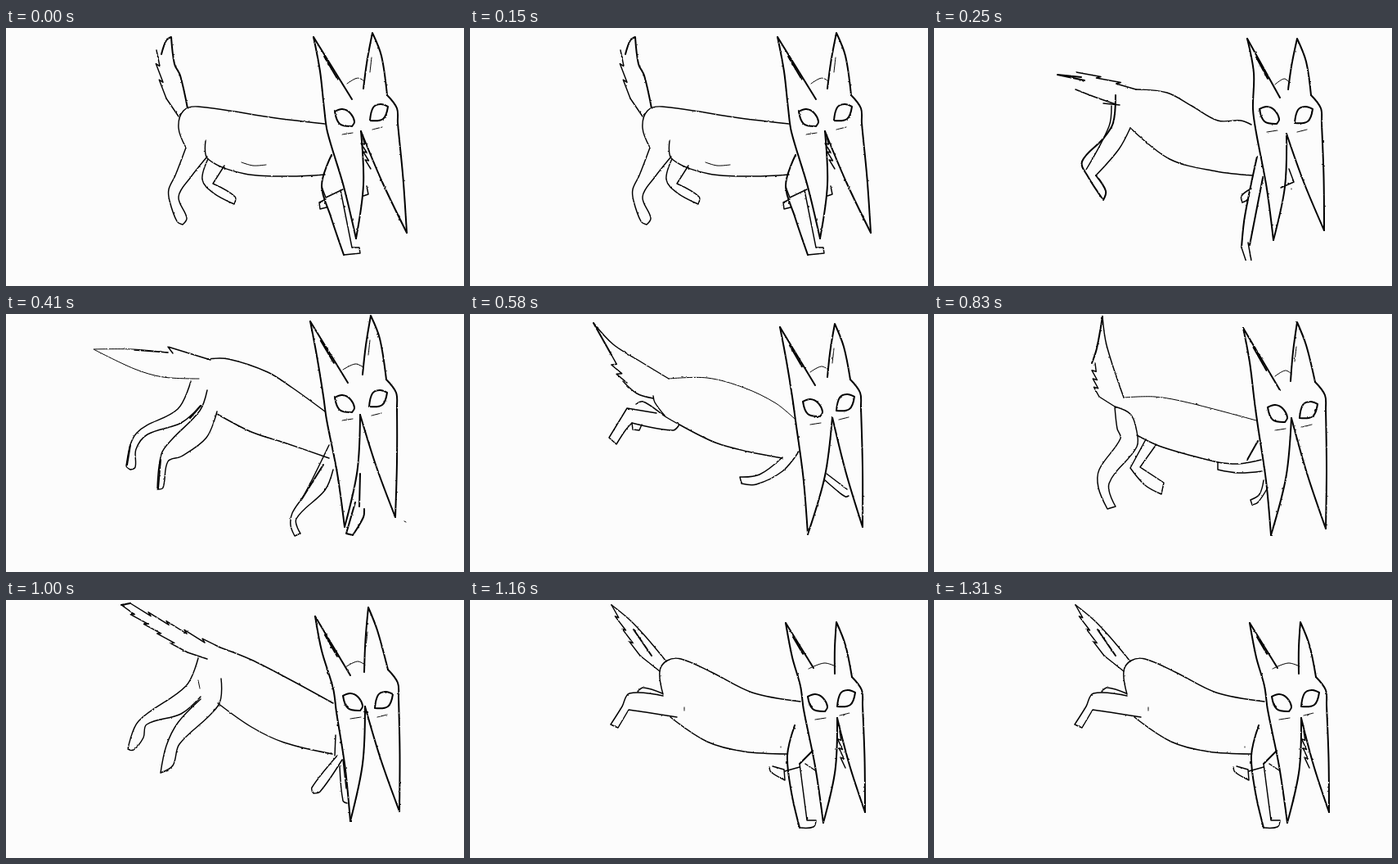
Write an HTML page that moves like this. It is 560x315 px and loops after 1410 ms.

```html
<!DOCTYPE html>
<html lang="en">
<head>
<meta charset="utf-8">
<title>Masked dog run cycle</title>
<style>
  html, body { margin: 0; width: 100%; height: 100%; overflow: hidden; background: #fcfcfc; }
  svg { display: block; width: 100vw; height: 100vh; }
  path { fill: none; stroke: #000; stroke-linecap: round; stroke-linejoin: round; }
</style>
</head>
<body>
<svg viewBox="0 0 560 315">
  <filter id="rough" filterUnits="userSpaceOnUse" width="560" height="315" color-interpolation-filters="sRGB">
    <feTurbulence type="fractalNoise" baseFrequency=".25" numOctaves="2" seed="4"/>
    <feDisplacementMap in="SourceGraphic" scale="2" xChannelSelector="R" yChannelSelector="G"/>
  </filter>
  <g id="dog" filter="url(#rough)"></g>
</svg>
<script>
const dog = document.getElementById('dog');

// Smooth line through x, y pairs; sharp turns stay corners.
function trace(n) {
  const pts = [];
  for (let i = 0; i < n.length; i += 2) pts.push([n[i], n[i + 1]]);
  const gap = (a, b) => [b[0] - a[0], b[1] - a[1]];
  const tangent = i => {
    if (!i || i === pts.length - 1) return [0, 0];
    const a = gap(pts[i - 1], pts[i]), b = gap(pts[i], pts[i + 1]);
    const cos = (a[0] * b[0] + a[1] * b[1]) / (Math.hypot(...a) * Math.hypot(...b));
    if (cos < .4) return [0, 0];
    const c = gap(pts[i - 1], pts[i + 1]), len = Math.hypot(...c);
    return [c[0] / len, c[1] / len];
  };
  let d = 'M' + pts[0];
  for (let i = 1; i < pts.length; i++) {
    const p = pts[i - 1], q = pts[i], r = Math.hypot(...gap(p, q)) / 3;
    const s = tangent(i - 1), e = tangent(i);
    d += `C${p[0] + s[0] * r} ${p[1] + s[1] * r} ${q[0] - e[0] * r} ${q[1] - e[1] * r} ${q}`;
  }
  return d;
}

const pen = width => (...n) => {
  const path = document.createElementNS('http://www.w3.org/2000/svg', 'path');
  path.setAttribute('d', trace(n));
  path.setAttribute('stroke-width', width);
  dog.append(path);
};
const fine = pen(1), ink = pen(1.45), bold = pen(2);

// Row of teeth standing h off the line.
function fur(x, y, x2, y2, teeth, h) {
  const dx = x2 - x, dy = y2 - y, len = Math.hypot(dx, dy), n = [x, y];
  for (let k = 1; k <= teeth; k++) {
    const t = k / teeth, u = t - .2 / teeth;
    n.push(x + dx * t, y + dy * t);
    if (k < teeth) n.push(x + dx * u - dy / len * h, y + dy * u + dx / len * h);
  }
  ink(...n);
}

function eye(x, y, ...shape) {
  const n = shape.map((v, i) => v + (i % 2 ? y : x));
  bold(...n, n[0], n[1]);
}

// Ear tips l, t and bases b, r, o; cheek c; jaw tips j, k; notch n; eyes e, f.
function head([lx, ly, bx, by], [rx, ry, tx, ty, ox, oy], [cx, cy, jx, jy, kx, ky, nx, ny], [ex, ey, fx, fy], dash = true) {
  const mid = (a, b, t = .5) => a + (b - a) * t;
  bold(lx, ly, lx + 8, ly + 42, cx - 4, cy - 29, cx, cy, mid(cx, jx) + 2, mid(cy, jy), jx, jy);
  bold(lx, ly, bx, by);
  bold(mid(lx, bx, .3) - 1, mid(ly, by, .3) + 1, mid(lx, bx, .65) - 1, mid(ly, by, .65) + 2);
  fine(bx - 6, ry - 6, mid(bx, rx), ry - 13, rx + 1, ry - 9);
  bold(rx, ry, mid(rx, tx) - 1, mid(ry, ty), tx, ty, tx + 11, ty + 28, ox, oy);
  if (dash) fine(tx - 1, ty + 30, tx - 3, ty + 48);
  bold(ox, oy, ox + 12, oy + 16, ox + 13, oy + 34, mid(ox + 13, kx) + 1, mid(oy + 34, ky), kx, ky);
  bold(kx, ky, mid(kx, nx) - 2, mid(ky, ny), nx, ny);
  bold(nx, ny, mid(nx, jx) + 6, mid(ny, jy), jx, jy);
  eye(ex, ey, -12, -7, -3, -10, 6, -6, 12, 5, 9, 11, -6, 8);
  eye(fx, fy, -11, 9, -7, -7, 2, -11, 11, -8, 5, 7);
  fine(ex - 3, ey + 21, ex + 10, ey + 19);
  fine(fx - 8, fy + 20, fx + 4, fy + 17);
}

function stand() {
  head([376, 11, 423, 87], [437, 74, 448, 6, 466, 82], [393, 127, 428, 257, 490, 250, 434, 126], [414, 109, 456, 104]);
  fur(184, 27, 196, 86, 3, 4);
  ink(196, 86, 211, 108);
  bold(190, 32, 196, 15, 202, 11, 206, 44, 213, 58, 222, 98);
  ink(220, 146, 211, 122, 217, 101, 235, 96, 330, 110, 390, 117);
  ink(244, 138, 247, 160, 292, 178, 345, 181, 390, 179);
  fine(288, 164, 302, 168, 318, 167);
  ink(220, 146, 207, 180, 199, 197, 200, 211, 209, 236, 216, 240, 221, 232, 211, 206, 226, 182, 246, 157);
  ink(247, 160, 240, 185, 253, 201, 279, 215, 280, 206, 253, 190, 267, 168);
  bold(398, 155, 386, 192, 397, 230, 413, 277);
  ink(413, 277, 433, 275, 432, 268, 423, 268, 409, 198);
  ink(386, 194, 391, 207, 412, 197);
  ink(391, 209, 383, 213, 384, 221, 392, 219);
  ink(437, 205, 443, 203, 441, 193);
  fur(436, 132, 446, 172, 4, 4);
}

function push() {
  head([383, 13, 423, 85], [433, 75, 444, 13, 461, 82], [394, 128, 415, 259, 477, 247, 431, 129], [410, 106, 452, 107], false);
  fur(247, 75, 174, 54, 3, 3);
  bold(184, 64, 151, 57, 180, 60);
  ink(173, 75, 196, 84, 222, 93);
  ink(207, 92, 227, 94);
  ink(247, 75, 285, 79, 315, 95, 347, 113, 375, 113, 388, 118);
  ink(240, 122, 288, 160, 345, 175, 390, 180);
  bold(222, 82, 219, 116, 207, 135, 181, 163, 188, 181, 207, 210, 210, 199, 198, 180);
  ink(217, 95, 214, 120, 186, 173);
  ink(240, 122, 226, 148, 198, 180);
  bold(395, 157, 380, 230, 376, 268);
  ink(376, 268, 384, 292, 389, 290, 384, 262);
  bold(402, 183, 386, 265);
  ink(388, 196, 376, 205, 377, 213, 384, 210);
  ink(434, 172, 440, 188, 424, 195);
  fine(437, 196, 437, 197);
}

function leap() {
  head([372, 9, 418, 84], [436, 74, 446, 2, 465, 80], [392, 129, 414, 260, 476, 248, 433, 123], [414, 109, 455, 104]);
  fine(198, 47, 155, 43, 107, 43, 157, 67, 192, 77, 236, 79);
  ink(157, 44, 198, 47);
  ink(204, 48, 198, 40, 250, 56);
  ink(246, 55, 272, 55, 320, 71, 350, 90, 390, 119);
  ink(258, 122, 300, 144, 340, 157, 395, 176);
  ink(226, 82, 210, 116, 160, 145, 147, 185, 152, 190, 158, 187, 159, 165, 173, 147, 214, 133, 238, 112);
  ink(246, 93, 237, 118, 203, 153, 190, 171, 185, 214, 192, 212, 198, 180, 214, 174, 245, 151, 258, 119);
  bold(238, 112, 225, 127);
  bold(189, 178, 186, 213);
  bold(152, 160, 148, 184);
  ink(395, 160, 365, 220, 350, 243, 348, 258, 353, 271, 360, 268, 355, 250, 390, 215, 400, 190);
  bold(388, 184, 361, 227);
  bold(433, 195, 432, 235);
  bold(427, 230, 416, 268, 424, 270, 437, 248, 438, 238);
  fine(487, 253, 489, 254);
}

function fly() {
  head([379, 16, 422, 87], [437, 77, 446, 12, 465, 80], [398, 130, 413, 269, 480, 260, 443, 126], [419, 114, 459, 109]);
  ink(243, 79, 205, 56, 175, 37, 151, 11);
  bold(151, 11, 173, 50);
  fur(173, 50, 192, 84, 3, 6);
  ink(187, 82, 204, 97, 224, 103);
  fine(243, 79, 290, 78, 335, 90, 374, 109, 397, 128);
  ink(256, 135, 300, 157, 340, 168, 382, 176);
  ink(224, 100, 226, 108, 238, 124);
  ink(203, 110, 212, 107, 240, 126, 256, 135, 248, 142, 198, 133);
  ink(228, 121, 192, 115, 170, 151, 179, 159, 190, 142, 198, 133, 199, 141, 207, 142, 210, 135);
  ink(382, 175, 354, 196, 330, 199, 332, 207, 350, 208, 382, 192, 402, 168);
  ink(436, 195, 461, 214);
  ink(433, 202, 448, 215, 459, 223, 463, 222);
}

function land() {
  head([378, 17, 423, 93], [436, 82, 444, 10, 466, 83], [396, 137, 412, 270, 479, 262, 437, 127], [420, 121, 458, 118]);
  ink(232, 102, 211, 38, 206, 3);
  bold(206, 3, 199, 42, 193, 60);
  fur(197, 60, 202, 101, 4, 5);
  ink(202, 101, 221, 113);
  fine(232, 102, 270, 101, 310, 108, 394, 130);
  ink(248, 148, 275, 161, 315, 173, 347, 181);
  ink(221, 113, 224, 140, 228, 152, 202, 190, 201, 212, 212, 238, 222, 235, 214, 207, 248, 162, 247, 139, 240, 122, 221, 113);
  ink(259, 153, 240, 188, 258, 209, 278, 220, 281, 206, 252, 187, 272, 159);
  ink(401, 192, 372, 194, 347, 190, 347, 181, 372, 183, 400, 178);
  bold(396, 155, 383, 178);
  ink(403, 203, 398, 220, 387, 227, 389, 233, 396, 230, 408, 212);
}

function spring() {
  head([378, 20, 421, 92], [438, 88, 443, 9, 467, 85], [404, 137, 421, 270, 481, 258, 439, 130], [424, 124, 462, 123]);
  fur(262, 58, 152, 4, 5, -3);
  fur(141, 6, 222, 64, 5, 3);
  bold(152, 4, 141, 6);
  ink(222, 64, 246, 72);
  ink(262, 58, 300, 73, 345, 96, 400, 126);
  ink(259, 126, 300, 155, 340, 174, 399, 188);
  ink(235, 71, 220, 105, 162, 148, 149, 182, 156, 183, 168, 168, 172, 152, 214, 139, 238, 118);
  ink(263, 96, 260, 128, 212, 176, 204, 202, 189, 211, 196, 178, 210, 150, 238, 121);
  fine(235, 98, 237, 108);
  ink(403, 165, 402, 190);
  ink(405, 190, 374, 229, 376, 236, 384, 234, 411, 195);
  ink(408, 203, 412, 245, 417, 248);
  ink(412, 195, 416, 230);
}

function reach() {
  head([386, 28, 420, 83], [446, 90, 448, 27, 467, 94], [408, 134, 432, 272, 483, 259, 449, 144], [425, 125, 460, 121], false);
  ink(240, 75, 215, 45, 195, 24, 173, 6);
  fur(173, 6, 208, 68, 4, 3);
  ink(208, 68, 232, 87);
  bold(200, 36, 222, 68);
  ink(236, 115, 232, 87, 241, 74, 258, 72, 295, 88, 345, 113, 404, 124);
  ink(245, 143, 290, 173, 335, 185, 388, 188);
  ink(236, 117, 195, 114, 186, 130, 172, 152, 181, 156, 194, 134, 215, 137, 253, 143);
  ink(205, 112, 212, 107, 235, 114);
  fine(262, 131, 262, 135);
  bold(397, 153, 388, 190, 393, 235, 403, 278);
  ink(403, 278, 420, 277, 423, 269, 412, 269, 403, 200);
  bold(403, 200, 419, 184);
  ink(366, 204, 368, 210, 385, 220, 384, 207, 370, 203);
  ink(385, 209, 403, 204);
  ink(410, 200, 422, 208);
  fine(380, 179, 380, 180);
  fur(452, 160, 459, 205, 4, 4);
}

const run = [[stand, 250], [push, 160], [leap, 170], [fly, 250], [land, 170], [spring, 160], [reach, 250]];
const total = run.reduce((sum, [, ms]) => sum + ms, 0);
const start = performance.now();
let shown;

function tick() {
  let t = (performance.now() - start) % total, i = 0;
  while (t >= run[i][1]) t -= run[i++][1];
  if (i !== shown) {
    shown = i;
    dog.replaceChildren();
    run[i][0]();
  }
  requestAnimationFrame(tick);
}
tick();
</script>
</body>
</html>
```
